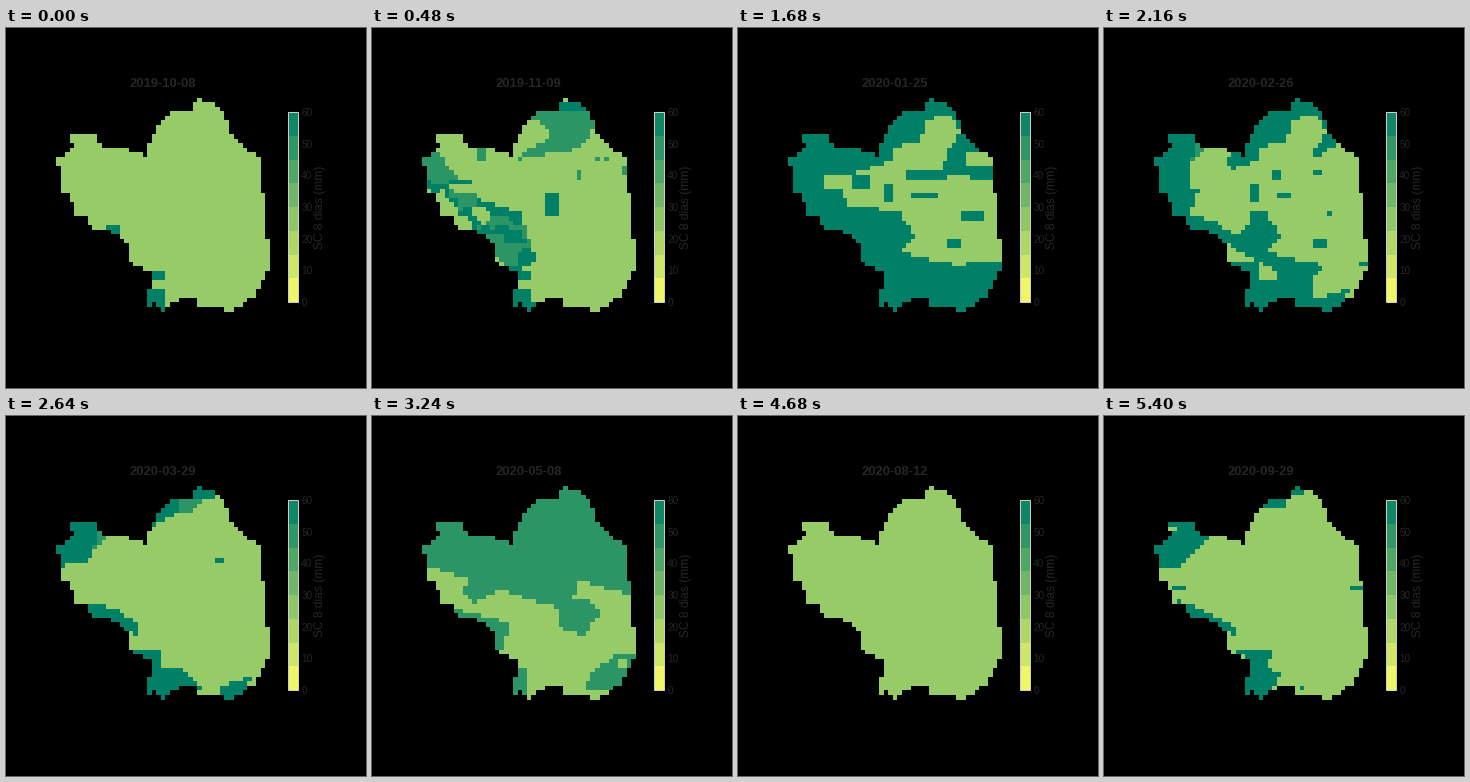
Animation, 360 px wide and 360 px high, one loop 5.52 s. Source, as a matplotlib script:

```python
import numpy as np
import matplotlib.pyplot as plt
from matplotlib.animation import FuncAnimation
from matplotlib.path import Path
from matplotlib.patches import Rectangle

plt.rcParams["font.family"] = "Liberation Sans"
SIZE, FRAMES, STEP = 360, 46, 120
N, CELL = 47, 4.553
X0, Y0 = 50.0, 69.6
TEXT = "#262626"
GREEN, MID, TEAL = 1, 2, 3
COLORS = np.array([(0, 0, 0), (150, 203, 103), (43, 149, 102), (0, 128, 102)]) / 255

steps = (np.arange(N) + 0.5) * CELL
cx, cy = np.meshgrid(X0 + steps, Y0 + steps)
centres = np.column_stack([cx.ravel(), cy.ravel()])


# ---- drawing on the cell grid, in stage coordinates
def inside(*points):
    return Path(points).contains_points(centres).reshape(N, N)


def shape(grid, level, *points):
    grid[inside(*points)] = level


def box(grid, level, x0, y0, x1, y1):
    grid[(cx > x0) & (cx < x1) & (cy > y0) & (cy < y1)] = level


def patches(seed, blur):
    """Clustered noise, ranked so that values spread evenly from 0 to 1."""
    field = np.random.default_rng(seed).normal(size=(N, N))
    for _ in range(blur):
        for axis in (0, 1):
            field = (np.roll(field, 1, axis) + field + np.roll(field, -1, axis)) / 3
    return field.ravel().argsort().argsort().reshape(N, N) / N**2


def mottle(grid, level, share, seed, *points):
    grid[inside(*points) & (patches(seed, 1) < share)] = level


BASIN = inside(
    # north lobe and east coast
    (140, 128), (145, 112), (150, 98), (161, 87), (170, 82), (186, 82), (188, 74),
    (193, 69), (196, 74), (209, 75), (215, 80), (221, 92), (224, 105), (241, 122),
    (251, 124), (255, 137), (255, 163), (259, 165), (259, 208), (264, 209),
    # south coast
    (264, 239), (259, 246), (248, 268), (230, 280), (221, 284), (217, 280),
    (196, 280), (188, 271), (164, 273), (159, 284), (154, 284), (150, 274),
    (141, 279), (141, 262), (146, 258), (145, 243),
    # south-west coast and north-west lobe
    (124, 235), (120, 211), (110, 206), (92, 201), (82, 197), (82, 189), (68, 187),
    (64, 165), (54, 163), (54, 138), (50, 137), (50, 128), (59, 127), (67, 119),
    (63, 110), (68, 105), (91, 106), (95, 119), (122, 119), (124, 124), (136, 124))


# ---- moisture maps at the turning points of the season
def october(g):
    box(g, TEAL, 99, 197, 113, 206)
    box(g, TEAL, 145, 242, 159, 251)
    box(g, TEAL, 141, 262, 159, 284)


def december(g):
    g[:] = TEAL
    shape(g, MID, (45, 100), (140, 60), (187, 83), (230, 83), (223, 130),
          (68, 155), (45, 152))
    shape(g, GREEN, (77, 157), (123, 151), (150, 130), (205, 121), (225, 105),
          (266, 130), (266, 228), (241, 262), (223, 258), (186, 233), (159, 226),
          (148, 185), (109, 172), (86, 165))
    box(g, TEAL, 173, 165, 187, 187)
    southwest = (66, 160), (110, 168), (155, 195), (160, 230), (122, 240), (66, 195)
    mottle(g, MID, 0.4, 5, *southwest)
    mottle(g, GREEN, 0.15, 6, *southwest)
    mottle(g, MID, 0.3, 7, (160, 245), (240, 255), (250, 275), (150, 275))
    mottle(g, MID, 0.08, 8, (205, 130), (258, 130), (264, 250), (205, 220))
    box(g, MID, 123, 215, 146, 237)


def january(g):
    g[:] = TEAL
    shape(g, GREEN, (86, 146), (114, 146), (155, 133), (155, 119), (182, 115),
          (187, 92), (214, 87), (223, 105), (209, 124), (205, 146), (256, 152),
          (266, 232), (218, 237), (160, 224), (176, 208), (162, 183), (109, 178),
          (105, 162), (86, 160))
    box(g, GREEN, 228, 124, 255, 138)
    box(g, TEAL, 114, 146, 132, 160)
    box(g, TEAL, 146, 155, 155, 174)
    box(g, TEAL, 168, 142, 209, 151)
    box(g, TEAL, 173, 165, 200, 170)
    box(g, TEAL, 223, 183, 246, 192)
    box(g, TEAL, 209, 210, 223, 219)


def march(g):
    shape(g, MID, (82, 110), (105, 119), (82, 142))
    shape(g, TEAL, (45, 100), (95, 105), (91, 122), (82, 146), (45, 151))
    shape(g, MID, (168, 96), (168, 80), (200, 80), (186, 96))
    shape(g, TEAL, (140, 112), (172, 98), (173, 83), (145, 90))
    box(g, TEAL, 187, 69, 209, 83)
    box(g, TEAL, 209, 142, 218, 147)
    shape(g, TEAL, (66, 186), (91, 187), (118, 197), (132, 210), (132, 219), (66, 205))
    shape(g, TEAL, (127, 233), (155, 234), (155, 251), (177, 254), (200, 275),
          (140, 290))
    shape(g, TEAL, (205, 285), (218, 270), (246, 260), (232, 285))


def may(g):
    shape(g, MID, (45, 60), (270, 60), (270, 182), (208, 165), (200, 183),
          (218, 185), (228, 196), (214, 219), (200, 217), (186, 210), (186, 192),
          (127, 174), (104, 187), (91, 178), (95, 162), (50, 148))
    shape(g, MID, (82, 192), (100, 197), (136, 206), (132, 233), (120, 233), (82, 201))
    box(g, MID, 140, 251, 155, 279)
    shape(g, MID, (214, 276), (218, 258), (246, 237), (262, 240), (250, 272))
    box(g, GREEN, 246, 242, 255, 251)


def june(g):
    box(g, TEAL, 68, 105, 82, 115)
    box(g, TEAL, 82, 174, 86, 179)
    box(g, TEAL, 155, 256, 164, 261)


def dry(g):
    g[:] = GREEN


def august(g):
    box(g, TEAL, 195, 270, 200, 275)


def september(g):
    august(g)
    shape(g, TEAL, (66, 105), (95, 105), (104, 124), (82, 142), (77, 151), (45, 151),
          (45, 125))
    box(g, GREEN, 63, 110, 73, 115)
    box(g, TEAL, 68, 169, 82, 174)
    shape(g, TEAL, (73, 183), (114, 201), (132, 210), (132, 219), (73, 201))
    shape(g, TEAL, (127, 233), (168, 235), (164, 251), (177, 258), (159, 286),
          (140, 286), (146, 243))
    shape(g, TEAL, (159, 92), (182, 92), (182, 83), (164, 83))
    box(g, TEAL, 187, 69, 200, 78)
    box(g, TEAL, 246, 169, 260, 174)


SEASON = {0: october, 8: december, 14: january, 22: march, 27: may,
          32: june, 35: dry, 40: august, 45: september}


def build(paint):
    grid = np.full((N, N), GREEN)
    paint(grid)
    return np.where(BASIN, grid, 0)


keys = list(SEASON)
maps = [build(paint) for paint in SEASON.values()]
orders = [patches(seed, 12) for seed in range(len(keys))]


def moisture(k):
    i = max(np.searchsorted(keys, k), 1)
    done = (k - keys[i - 1]) / (keys[i] - keys[i - 1])
    return np.where(orders[i] < done, maps[i], maps[i - 1])


def to_pixels(grid):
    """Each pixel takes the cell under its centre; index N is the dark border."""
    centre = np.arange(SIZE) + 0.5
    col, row = ((centre - start) // CELL for start in (X0, Y0))
    col, row = (np.where((v >= 0) & (v < N), v, N).astype(int) for v in (col, row))
    return COLORS[np.pad(grid, (0, 1))[row][:, col]]


def date_label(k):
    # the eight-day calendar restarts on the first of January
    start, days = ("2019-10-08", 8 * k) if k < 11 else ("2020-01-01", 8 * (k - 11))
    return str(np.datetime64(start) + days)


# ---- stage
fig = plt.figure(figsize=(SIZE / 72, SIZE / 72), dpi=72, facecolor="black")
ax = fig.add_axes([0, 0, 1, 1])
ax.axis("off")
image = ax.imshow(to_pixels(moisture(0)), extent=(0, SIZE, SIZE, 0),
                  interpolation="nearest", aspect="auto")
title = ax.text(156.6, 59, date_label(0), size=13, weight="bold", color=TEXT,
                ha="center", va="baseline")

# colour bar
LEFT, WIDTH, TOP, BOTTOM, BANDS = 282.15, 9.9, 84, 274, 8
band = (BOTTOM - TOP) / BANDS
summer = plt.get_cmap("summer_r")
for i in range(BANDS):
    ax.add_patch(Rectangle((LEFT, BOTTOM - (i + 1) * band), WIDTH, band, lw=0,
                           color=summer((i + 0.5) / BANDS), antialiased=False))
ax.add_patch(Rectangle((LEFT, TOP), WIDTH, BOTTOM - TOP, fill=False, ec="0.8", lw=1))
for value in range(0, 61, 10):
    y = BOTTOM - value / 60 * (BOTTOM - TOP)
    ax.text(295.2, y, str(value), size=10, color=TEXT, va="center_baseline")
ax.text(314, 179.5, "SC 8 dias (mm)", size=12, color=TEXT, rotation=90,
        ha="center", va="center")

ax.set_xlim(0, SIZE)
ax.set_ylim(SIZE, 0)


def update(k):
    image.set_data(to_pixels(moisture(k)))
    title.set_text(date_label(k))
    return image, title


anim = FuncAnimation(fig, update, frames=FRAMES, interval=STEP, repeat=True,
                     repeat_delay=0)
plt.show()
```
